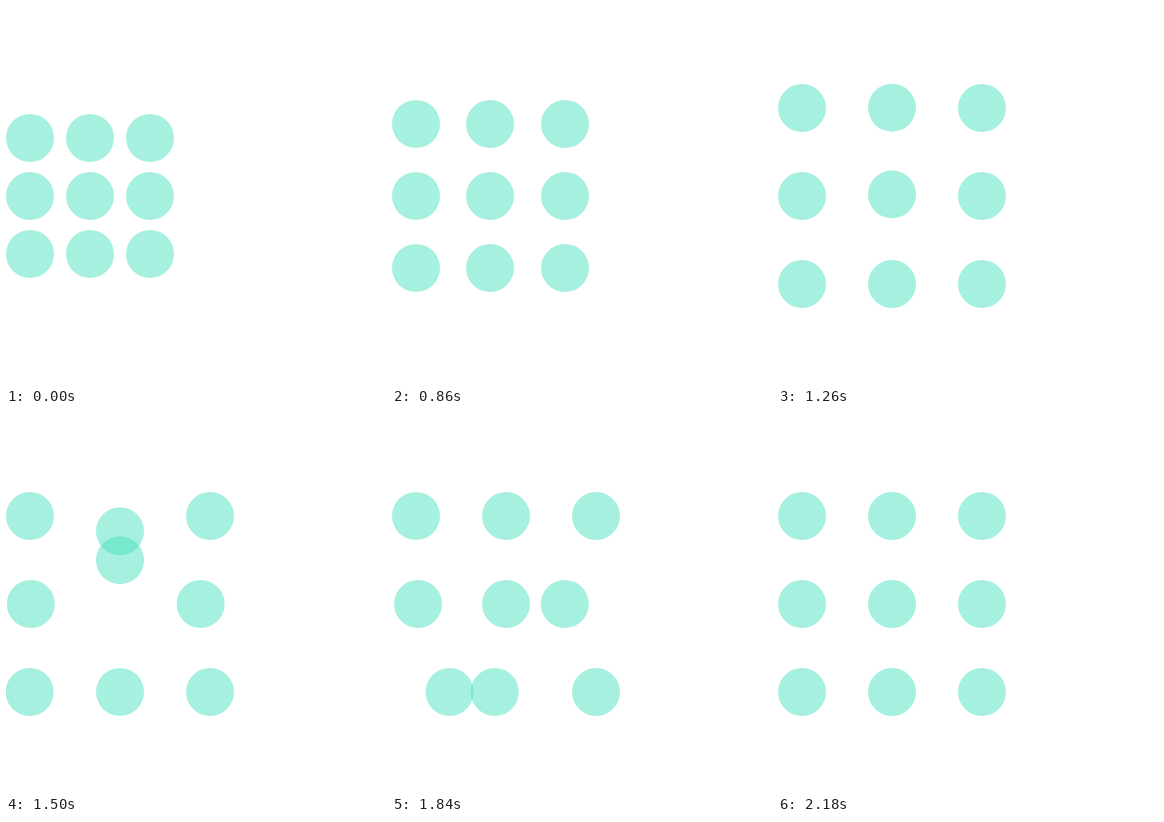
An HTML page that plays this animation: 380 px wide and 380 px high, repeating every 4.4 s.

```html
<!DOCTYPE html>
<html lang="en">
<head>
<meta charset="utf-8">
<title>Dot grid</title>
<style>
  html, body { margin: 0; width: 100%; height: 100%; overflow: hidden; background: #fff; }
  svg { display: block; width: 100%; height: 100%; }
  circle { fill: #4de1bd; fill-opacity: .5; }
</style>
</head>
<body>
<svg viewBox="0 0 380 380"></svg>
<script>
const LOOP = 4400;
const svg = document.querySelector('svg');

function bezier(x1, y1, x2, y2) {
  const at = (a, b, s) => 3 * a * s * (1 - s) ** 2 + 3 * b * s * s * (1 - s) + s ** 3;
  return x => {
    if (x <= 0) return 0;
    if (x >= 1) return 1;
    let lo = 0, hi = 1;
    for (let i = 0; i < 30; i++) {
      const mid = (lo + hi) / 2;
      if (at(x1, x2, mid) < x) lo = mid; else hi = mid;
    }
    return at(y1, y2, lo);
  };
}

const spreadEase = bezier(.753, 0, .017, 1);
const swapEase = bezier(.88, -.08, .55, 1);
const spread = { start: 508, time: 859 };
const SWAP_TIME = 600;

// Swaps, keyed by row and column: start time and travel
const swaps = {
  '1,1': { start: 1099, dx: 0, dy: -88 },
  '0,1': { start: 1193, dx: 0, dy: 88 },
  '1,2': { start: 1285, dx: -180, dy: 0 },
  '1,0': { start: 1376, dx: 180, dy: 0 },
  '2,0': { start: 1465, dx: 90, dy: 0 },
  '2,1': { start: 1561, dx: -90, dy: 0 }
};

const dots = [];
for (let row = 0; row < 3; row++) {
  for (let col = 0; col < 3; col++) {
    const el = document.createElementNS('http://www.w3.org/2000/svg', 'circle');
    el.setAttribute('r', 24);
    svg.append(el);
    dots.push({ el, row, col, swap: swaps[row + ',' + col] });
  }
}

function draw(t) {
  const gap = 30 * spreadEase((t - spread.start) / spread.time);
  for (const { el, row, col, swap } of dots) {
    // The spreading grid sits on whole pixels
    let x = 24 + Math.round(col * (60 + gap));
    let y = 190 + Math.round((row - 1) * (58 + gap));
    if (swap) {
      const p = swapEase((t - swap.start) / SWAP_TIME);
      x += swap.dx * p;
      y += swap.dy * p;
    }
    el.setAttribute('cx', x);
    el.setAttribute('cy', y);
  }
}

const begin = performance.now();
function tick() {
  draw((performance.now() - begin) % LOOP);
  requestAnimationFrame(tick);
}
tick();
</script>
</body>
</html>
```
